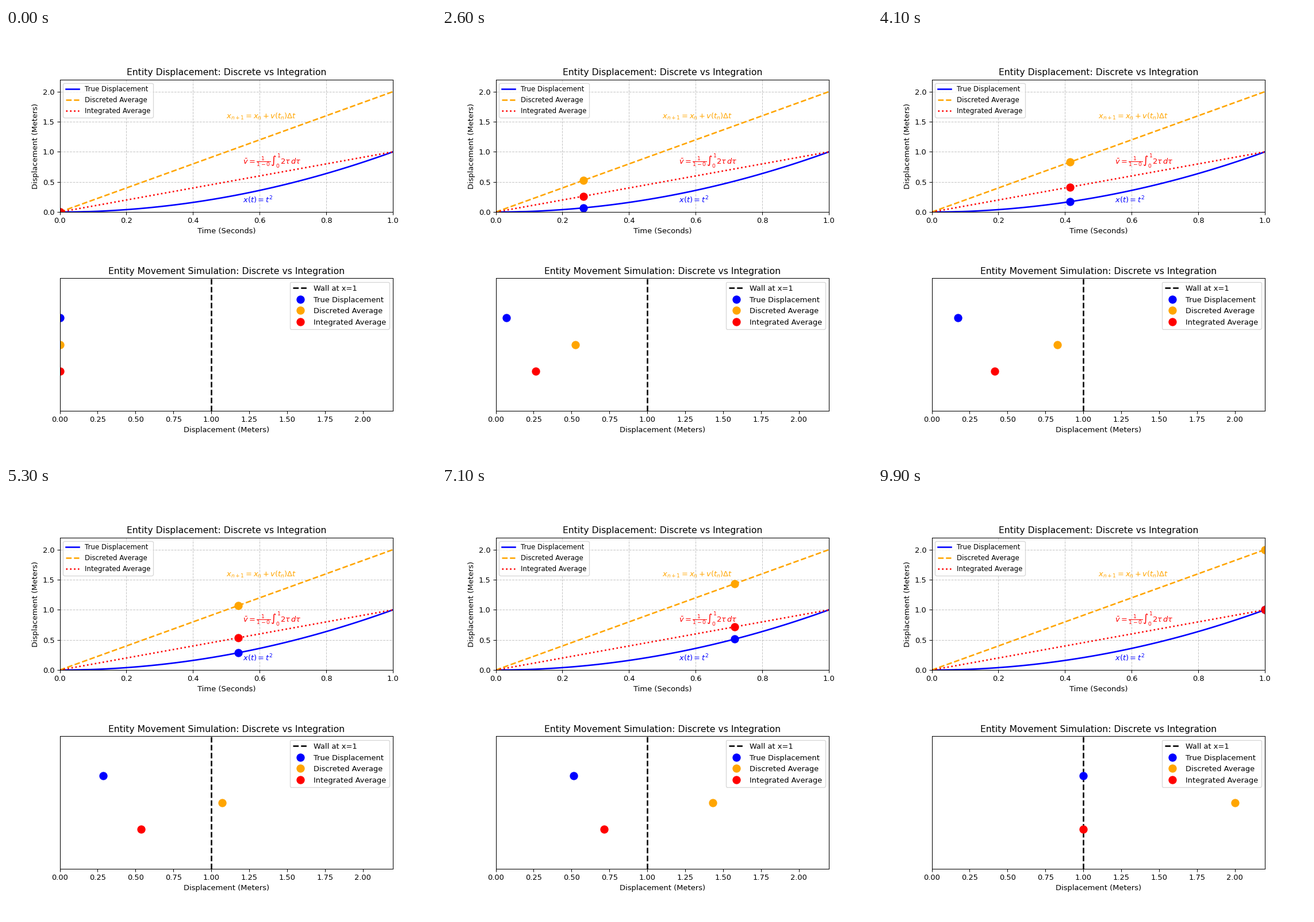
These frames come from a looping animation (748x748 px, 10 s). A matplotlib script:

```python
import numpy as np
import matplotlib.pyplot as plt
from matplotlib.animation import FuncAnimation

FRAMES = 100
plt.rcParams["font.family"] = "DejaVu Sans"

t = np.linspace(0, 1, FRAMES)
# label, path, colour, line style, height of the dot in the lower plot
entities = [
    ("True Displacement", t**2, "blue", "-", 0.7),
    ("Discreted Average", 2 * t, "orange", "--", 0.5),
    ("Integrated Average", t, "red", ":", 0.3),
]

fig, (ax_plot, ax_sim) = plt.subplots(2, 1, figsize=(8, 8), dpi=93.5)
fig.subplots_adjust(left=0.125, right=0.9, bottom=0.11, top=0.88, hspace=0.5)

ax_plot.set(xlim=(0, 1), ylim=(0, 2.2),
            xlabel="Time (Seconds)", ylabel="Displacement (Meters)",
            title="Entity Displacement: Discrete vs Integration")
ax_plot.grid(True, linestyle="--", alpha=0.7)
for label, path, color, style, _ in entities:
    ax_plot.plot(t, path, color=color, linestyle=style, linewidth=2, label=label)
ax_plot.legend(loc="upper left", fontsize=9)

ax_plot.text(0.55, 0.15, r"$x(t) = t^2$", color="blue")
ax_plot.text(0.5, 1.55, r"$x_{n+1} = x_n + v(t_n)\Delta t$", color="orange")
ax_plot.text(0.55, 0.8, r"$\bar{v} = \frac{1}{1-0}\int_0^1 2\tau \, d\tau$", color="red")

ax_sim.set(xlim=(0, 2.2), ylim=(0, 1), yticks=[],
           xlabel="Displacement (Meters)",
           title="Entity Movement Simulation: Discrete vs Integration")
ax_sim.axvline(1, color="black", linestyle="--", linewidth=2, label="Wall at x=1")


def add_dot(ax, color, label=None):
    return ax.plot([], [], "o", color=color, markersize=10, label=label)[0]


curve_dots = [add_dot(ax_plot, e[2]) for e in entities]
sim_dots = [add_dot(ax_sim, e[2], e[0]) for e in entities]
ax_sim.legend(loc="upper right")


def update(i):
    for (_, path, _, _, height), on_curve, in_sim in zip(entities, curve_dots, sim_dots):
        on_curve.set_data([t[i]], [path[i]])
        in_sim.set_data([path[i]], [height])
    return curve_dots + sim_dots


anim = FuncAnimation(fig, update, frames=FRAMES, interval=100, repeat=True, repeat_delay=0)
plt.show()
```
